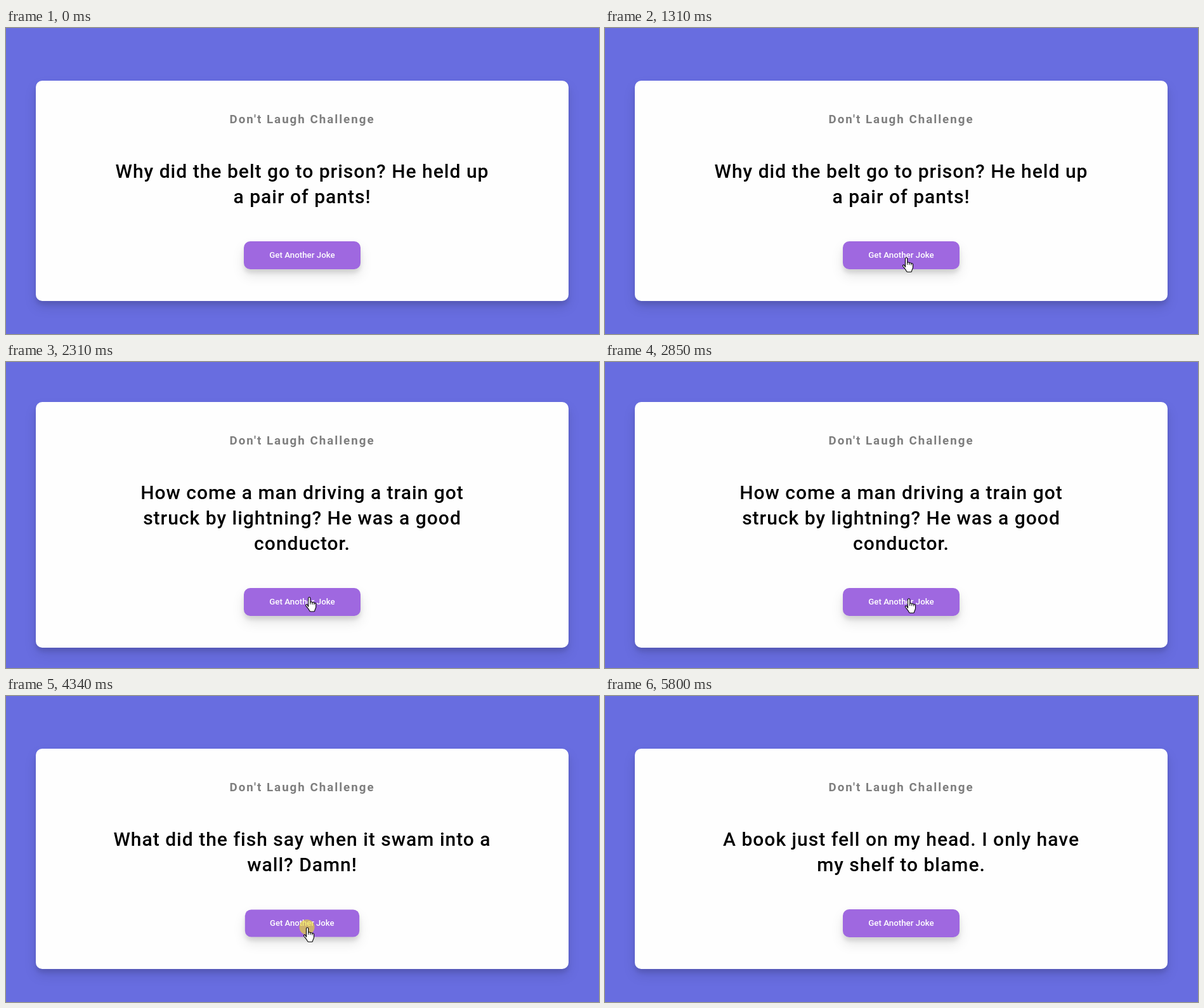
Animation of 935x482 px, one loop 6430 ms. Source, as an HTML page:

```html
<!DOCTYPE html>
<html lang="en">
<head>
<meta charset="utf-8">
<title>Don't Laugh Challenge</title>
<style>
  html, body { margin: 0; width: 100%; height: 100%; overflow: hidden; }
  body { position: relative; background: #686de0; font-family: Roboto, Arial, sans-serif; text-align: center; }
  .page { position: absolute; left: 0; top: 0; width: 934px; height: 513px; display: flex; align-items: center; justify-content: center; }
  .card {
    width: 840px; padding: 50px 20px; box-sizing: border-box; background: #fefefe; border-radius: 10px;
    box-shadow: 0 10px 20px rgba(0, 0, 0, .1), 0 6px 6px rgba(0, 0, 0, .1);
  }
  h3 { margin: 0; font-size: 18.72px; line-height: 23px; letter-spacing: 2px; color: #000; opacity: .5; }
  .joke { max-width: 600px; margin: 50px auto; font-size: 30px; line-height: 40px; font-weight: 500; letter-spacing: 1px; color: #000; }
  .btn {
    display: block; width: fit-content; margin: 0 auto; padding: 14px 40px; border: 0; border-radius: 10px;
    background: #9f68e0; color: #fff; font: 500 13.333px/16px Roboto, Arial, sans-serif;
    box-shadow: 0 10px 20px rgba(0, 0, 0, .1), 0 6px 6px rgba(0, 0, 0, .1);
  }
  .btn.down { transform: scale(.98); }
  svg { position: absolute; left: 0; top: 0; width: 935px; height: 482px; pointer-events: none; }
  .outline { fill: #fff; stroke: #000; stroke-width: 1.1; stroke-linejoin: round; }
  .line { fill: none; stroke: #000; stroke-width: 1; }
</style>
</head>
<body>
<div class="page">
  <div class="card">
    <h3>Don't Laugh Challenge</h3>
    <div class="joke"></div>
    <button class="btn" tabindex="-1">Get Another Joke</button>
  </div>
</div>
<svg viewBox="0 0 935 482">
  <g id="cursor">
    <circle id="halo" r="12" fill="rgba(238,228,30,.6)"/>
    <g id="hand" transform="translate(-6 0)">
      <path class="outline" d="M5 15.5V2.3a1.6 1.6 0 0 1 3.2 0V8.7c.3-1.1 3-.9 3.1.6.4-1 2.9-.7 3 .9.5-.9 2.7-.5 2.7 1.2V16c0 2-1.5 3.5-1.8 5.5 0 1-.4 1.7-1.5 1.7H8.5c-1 0-1.6-.7-2-1.7C5.6 19 3 16.8 1.2 14.3c-.9-1.4.8-2.9 2.1-1.8z"/>
      <path class="line" d="M8.2 8.5V12M11.3 9.3v3M14.3 10.2v2.5"/>
    </g>
    <path id="arrow" class="outline" d="M.5.5v16l3.7-3.4 2.3 5.3L9 17.3 6.7 12h5.1z"/>
  </g>
</svg>
<script>
const LOOP = 6430, GONE = 5800;
const $ = s => document.querySelector(s);
const joke = $('.joke'), btn = $('.btn');
const cursor = $('#cursor'), halo = $('#halo'), hand = $('#hand'), arrow = $('#arrow');

const opening = 'Why did the belt go to prison? He held up a pair of pants!';
const rounds = [
  { press: 1140, release: 1310, swap: 1460, text: 'How come a man driving a train got struck by lightning? He was a good conductor.' },
  { press: 2620, release: 2850, swap: 3020, text: 'What did the fish say when it swam into a wall? Damn!' },
  { press: 4340, release: 4490, swap: 4640, text: 'A book just fell on my head. I only have my shelf to blame.' }
];

const easeIn = u => u * u;
const easeOut = u => 1 - (1 - u) ** 2;
const linear = u => u;

// The pointer tip glides between resting points in even time steps.
const entry = { x: 757, y: 474 }, first = { x: 474.5, y: 361 };
const second = { x: 478.5, y: 372 }, third = { x: 474.5, y: 364 }, exit = { x: 793, y: 455 };
const glides = [
  { start: 220, end: 990, steps: 10, from: entry, to: first, ease: easeOut },
  { start: 1990, end: 2390, steps: 5, from: first, to: second, ease: linear },
  { start: 3640, end: 3880, steps: 3, from: second, to: third, ease: linear },
  { start: 5340, end: 5720, steps: 5, from: third, to: exit, ease: easeIn }
];

const mix = (a, b, k) => a + (b - a) * k;
const show = (el, on) => { el.style.display = on ? '' : 'none'; };

function tipAt(t) {
  const g = glides.filter(g => g.start <= t).pop();
  if (!g || t >= GONE) return null;
  const u = Math.min(1, (t - g.start) / (g.end - g.start));
  const k = g.ease(Math.floor(u * g.steps) / g.steps);
  return { x: mix(g.from.x, g.to.x, k), y: mix(g.from.y, g.to.y, k) };
}

function overButton({ x, y }) {
  const box = btn.getBoundingClientRect();
  return x >= box.left && x <= box.right && y >= box.top && y <= box.bottom;
}

function draw(t) {
  const round = rounds.filter(r => r.swap <= t).pop();
  const text = round ? round.text : opening;
  if (joke.textContent !== text) joke.textContent = text;

  const pressed = rounds.some(r => t >= r.press && t < r.release);
  btn.classList.toggle('down', pressed);
  show(halo, pressed);

  const tip = tipAt(t);
  show(cursor, tip);
  if (!tip) return;
  // The hand stays for the whole rest between entry and exit.
  const resting = t >= glides[0].end && t < glides[3].start;
  const pointing = resting || overButton(tip);
  show(hand, pointing);
  show(arrow, !pointing);
  cursor.setAttribute('transform', `translate(${tip.x} ${tip.y})`);
}

const begin = performance.now();
function tick() {
  draw((performance.now() - begin) % LOOP);
  requestAnimationFrame(tick);
}
tick();
</script>
</body>
</html>
```
